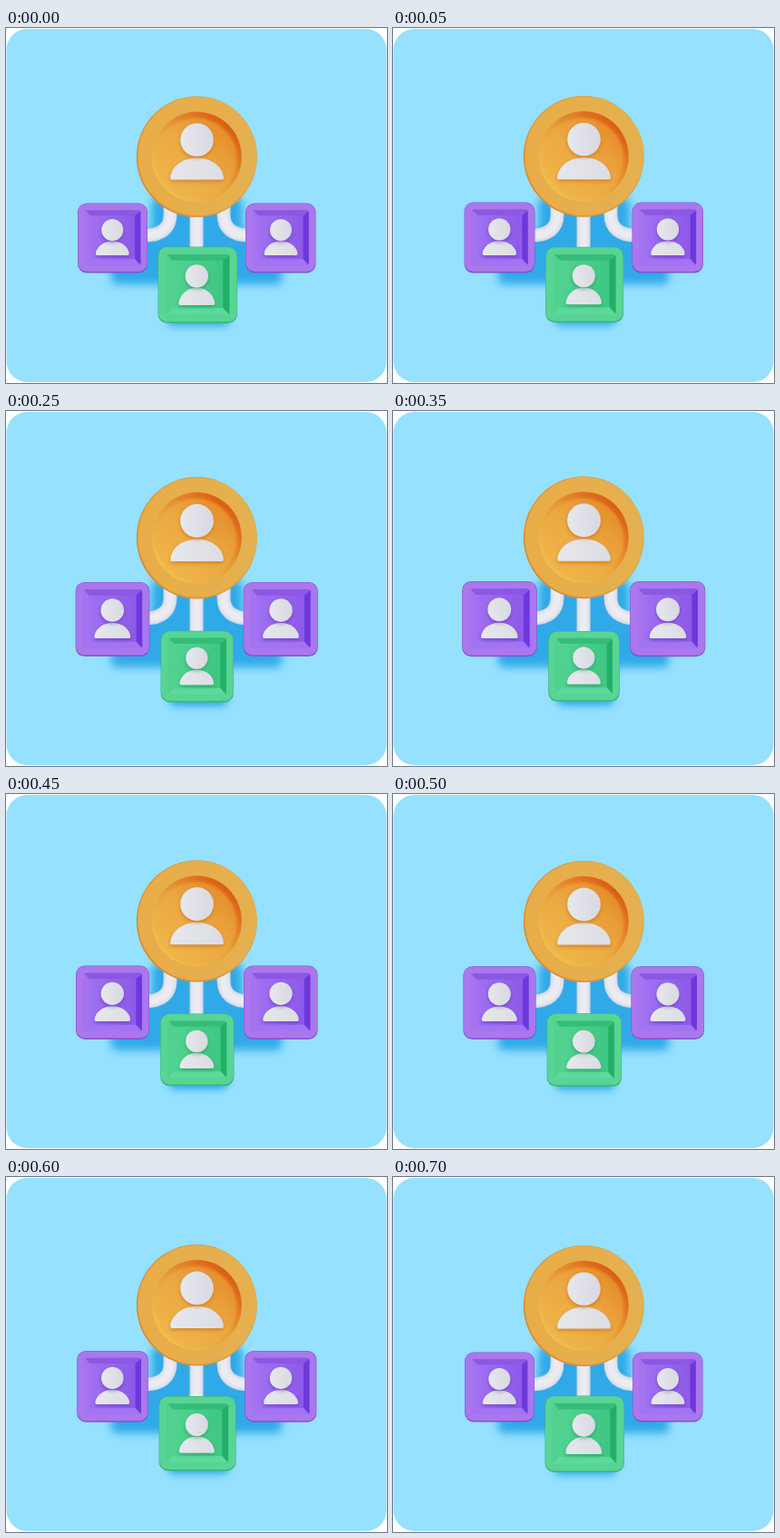
Recreate the animation shown at these times as an HTML page with a canvas. Size 420 by 392 pixels, loop 750 ms.

```html
<!DOCTYPE html>
<html lang="en">
<head>
<meta charset="utf-8">
<title>Team network</title>
<style>
html, body { margin: 0; width: 100%; height: 100%; overflow: hidden; background: #fff; }
canvas { display: block; }
</style>
</head>
<body>
<canvas id="stage" width="420" height="392"></canvas>
<script>
const ctx = document.getElementById('stage').getContext('2d');
const LOOP = 750, STEP = 50, PEAK = 325, END = 700;
const PURPLE = { side: '#8250d2', frame: '#aa77ec', top: '#8a58e2', left: '#a572f0', right: '#6c38dc', bottom: '#a273f4', floor: ['#a274f2', '#8b56e8'] };
const GREEN = { side: '#35b578', frame: '#58d495', top: '#34bd78', left: '#50d18e', right: '#22b068', bottom: '#5bda9b', floor: ['#54d494', '#3dc580'] };

const mix = (from, to, p) => from.map((v, i) => v + (to[i] - v) * p);

function gradient(x0, y0, x1, y1, ...colors) {
  const g = ctx.createLinearGradient(x0, y0, x1, y1);
  colors.forEach((c, i) => g.addColorStop(i / (colors.length - 1), c));
  return g;
}

function roundRect(x0, y0, x1, y1, r, fill) {
  ctx.beginPath();
  ctx.roundRect(x0, y0, x1 - x0, y1 - y0, r);
  ctx.fillStyle = fill;
  ctx.fill();
}

function ellipse(x, y, rx, ry, fill) {
  ctx.beginPath();
  ctx.ellipse(x, y, rx, ry, 0, 0, Math.PI * 2);
  ctx.fillStyle = fill;
  ctx.fill();
}

function polygon(fill, ...points) {
  ctx.beginPath();
  points.forEach(([x, y]) => ctx.lineTo(x, y));
  ctx.closePath();
  ctx.fillStyle = fill;
  ctx.fill();
}

function blurred(radius, draw) {
  ctx.save();
  ctx.filter = `blur(${radius}px)`;
  draw();
  ctx.restore();
}

function person(x, [headY, headR, halfW, top, bottom], shade) {
  ctx.save();
  ctx.shadowColor = shade;
  ctx.shadowBlur = 4;
  ctx.shadowOffsetY = 2;
  const l = x - halfW, r = x + halfW, shoulder = top + (bottom - top) * .4;
  ctx.beginPath();
  ctx.moveTo(l, bottom - 2);
  ctx.bezierCurveTo(l + 1, shoulder, x - halfW * .55, top, x, top);
  ctx.bezierCurveTo(x + halfW * .55, top, r - 1, shoulder, r, bottom - 2);
  ctx.quadraticCurveTo(r, bottom, r - 2, bottom);
  ctx.lineTo(l + 2, bottom);
  ctx.quadraticCurveTo(l, bottom, l, bottom - 2);
  ctx.fillStyle = gradient(l, 0, r, 0, '#e6e8ec', '#dcdde4');
  ctx.fill();
  ellipse(x, headY, headR, headR, gradient(x - headR, 0, x + headR, 0, '#e6e8ec', '#d8d9e1'));
  ctx.restore();
}

function tile([x0, y0, x1, y1], c) {
  const w = x1 - x0, h = y1 - y0;
  const a = x0 + w * .1, b = x1 - w * .1, t = y0 + h * .1, u = y1 - h * .11;
  const fa = x0 + w * .18, fb = x1 - w * .18, ft = y0 + h * .18, fu = y1 - h * .2;
  roundRect(x0, y0, x1, y1, 10, c.side);
  roundRect(x0 + .5, y0 + .5, x1 - .5, y1 - 1.5, 9.5, c.frame);
  roundRect(a, t, b, u, 3, gradient(a, 0, b, 0, ...c.floor));
  polygon(c.top, [a + 1, t], [b - 1, t], [fb, ft], [fa, ft]);
  polygon(c.left, [a, t + 1], [fa, ft], [fa, fu], [a, u - 1]);
  polygon(c.right, [b, t + 1], [fb, ft], [fb, fu], [b, u - 1]);
  polygon(c.bottom, [a + 1, u], [fa, fu], [fb, fu], [b - 1, u]);
}

function pipes() {
  const curve = side => {
    ctx.moveTo(210.5 + side * 29.5, 190);
    ctx.lineTo(210.5 + side * 29.5, 206);
    ctx.bezierCurveTo(210.5 + side * 29.5, 221, 210.5 + side * 39, 229, 210.5 + side * 58, 229);
  };
  ctx.beginPath();
  curve(-1);
  curve(1);
  ctx.moveTo(210, 190);
  ctx.lineTo(210, 246);
  for (const [width, color] of [[15, '#d2d6e6'], [12, '#e3e5ee'], [7, '#ebecf2']]) {
    ctx.lineWidth = width;
    ctx.strokeStyle = color;
    ctx.stroke();
  }
}

function coin(p) {
  const [top, bottom] = mix([75.5, 209], [72, 207], p);
  const x = 210.3, y = (top + bottom) / 2, ry = (bottom - top) / 2;
  ellipse(x, y, 66.5, ry, gradient(150, 0, 270, 0, '#d98a34', '#dda040'));
  ellipse(x + .5, y - .6, 65.5, ry - 1.2, gradient(150, 0, 270, 0, '#e8ad48', '#e5b04f'));
  ellipse(x, y, 49.5, ry - 17, gradient(175, bottom - 30, 245, top + 30, '#f2c052', '#e8a03a', '#da5c12'));
  blurred(1.5, () => ellipse(x - 1, y + 2, 45, ry - 22, gradient(175, bottom - 30, 245, top + 30, '#efb64a', '#eba941', '#e58a28')));
  person(210.5, mix([123.5, 18.3, 29.5, 143.5, 167.5], [120.5, 18.5, 29.3, 141, 165.5], p), '#c4641499');
}

function shadows(p) {
  blurred(5, () => {
    roundRect(116, 225, 304, 283, 6, '#30a9e8');
    roundRect(160, 185, 261, 250, 12, '#30a9e8');
  });
  blurred(4, () => {
    const [l, r, bottom] = mix([178, 246, 329], [181, 243, 325], p);
    roundRect(l, 270, r, bottom, 6, '#30a9e8');
  });
}

function draw(time) {
  const t = Math.floor(time % LOOP / STEP) * STEP;
  const p = t < PEAK ? t / PEAK : Math.max(0, (END - t) / (END - PEAK));
  ctx.clearRect(0, 0, 420, 392);
  roundRect(.5, 1, 419.5, 391, 23, '#95e1ff');

  shadows(p);
  pipes();
  coin(p);

  const member = mix([223, 12, 18.5, 235.5, 251], [219, 13, 20.5, 233.5, 251], p);
  tile(mix([79, 193.5, 156, 270.5], [76, 187.5, 159, 271.3], p), PURPLE);
  person(117.3, member, '#5a28b080');
  tile(mix([264, 193.5, 341.5, 270.5], [261, 187.5, 344.5, 271.3], p), PURPLE);
  person(303, member, '#5a28b080');
  tile(mix([167.5, 241.5, 255, 326], [171.5, 243, 249.5, 320.5], p), GREEN);
  person(210.3, mix([274, 12.7, 20, 287, 306], [272.5, 12, 18.5, 285.5, 301.5], p), '#128a5280');
}

function loop() {
  draw(performance.now());
  requestAnimationFrame(loop);
}
loop();
</script>
</body>
</html>
```
